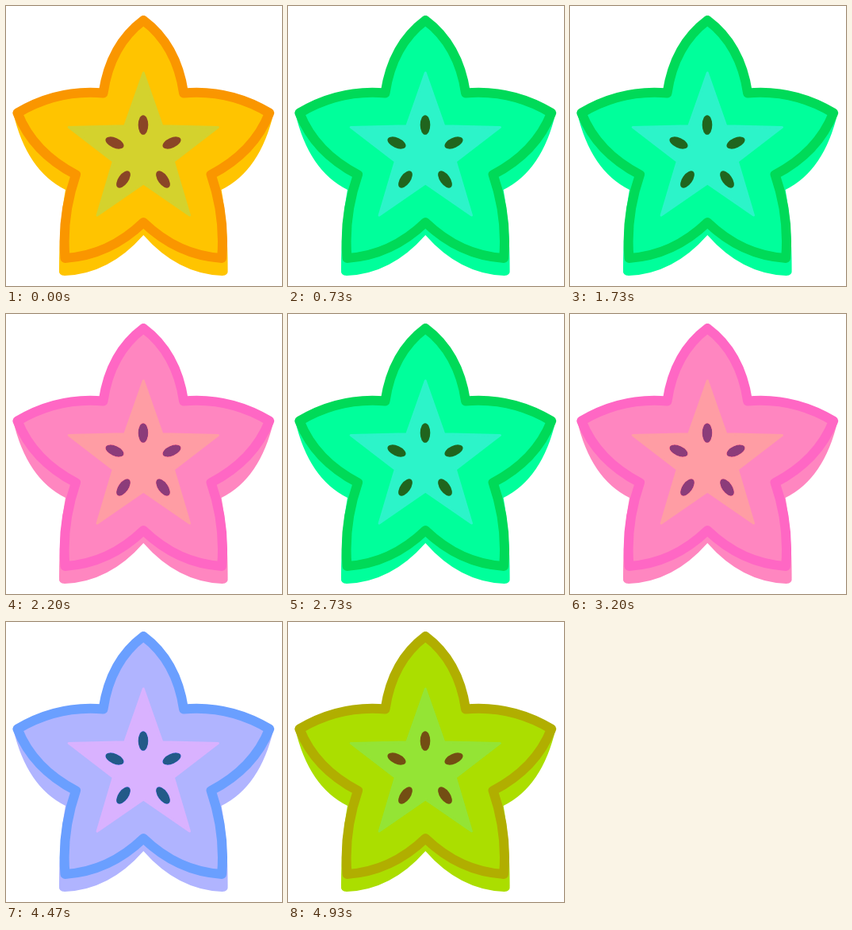
An HTML page that plays this animation: 348 by 352 pixels, repeating every 4990 ms.

```html
<!DOCTYPE html>
<html lang="en">
<head>
<meta charset="utf-8">
<title>Star fruit</title>
<style>
  html, body { margin: 0; width: 100%; height: 100%; overflow: hidden; background: #fff; }
  svg { display: block; width: 348px; height: 352px; }
  .side { fill: #ffc400; }
  .face { fill: #ffc400; stroke: #fa9600; stroke-width: 12; stroke-linejoin: round; }
  .core { fill: #d4d22d; stroke: #d4d22d; stroke-width: 3; stroke-linejoin: round; }
  .seed { fill: #8a4526; }
</style>
</head>
<body>
<svg id="fruit" viewBox="0 0 348 352"></svg>
<script>
const LOOP = 4990;
const STEP = 1000 / 15;
const STEPS_PER_TURN = 15;
const CX = 173.3, CY = 183;
const fruit = document.getElementById('fruit');

function add(tag, attrs) {
  const el = document.createElementNS('http://www.w3.org/2000/svg', tag);
  for (const name in attrs) el.setAttribute(name, attrs[name]);
  fruit.append(el);
}

// Closed symmetric shape from its left half: a start on the axis, then
// alternating control and end points of quadratic curves back to the axis.
function mirrored(half) {
  const right = half.map(([x, y]) => [2 * CX - x, y]).reverse();
  const [start, ...rest] = half.concat(right.slice(1));
  let d = 'M' + start;
  for (let i = 0; i < rest.length; i += 2) d += `Q${rest[i]} ${rest[i + 1]}`;
  return d + 'Z';
}

function straightStar(outer, inner) {
  const points = [];
  for (let i = 0; i < 10; i++) {
    const r = i % 2 ? inner : outer, a = i * Math.PI / 5;
    points.push([CX + r * Math.sin(a), CY - r * Math.cos(a)]);
  }
  return 'M' + points.join('L') + 'Z';
}

add('path', { class: 'side', d: mirrored([
  [CX, 134], [90, 134], [9, 134], [26, 207], [75, 231], [67, 275], [67, 331],
  [66, 339], [74, 339], [130, 337], [CX, 288]
]) });

add('path', { class: 'face', d: mirrored([
  [CX, 18], [131.5, 49], [122.5, 109.5], [65, 104.5], [14.5, 134.5], [34, 184], [88, 212],
  [70, 264], [74.5, 317], [130, 313.5], [CX, 272]
]) });

add('path', { class: 'core', d: straightStar(99, 40) });

const seeds = [
  [173, 149.5, 0], [137, 172, -66], [209, 172, 66], [148, 218, 36], [198, 218, -36]
];
for (const [x, y, turn] of seeds) {
  add('ellipse', { class: 'seed', rx: 6.3, ry: 12.3, transform: `translate(${x} ${y}) rotate(${turn})` });
}

function draw() {
  const t = performance.now() % LOOP;
  const step = Math.floor((t + 3.4) / STEP) % STEPS_PER_TURN;
  fruit.style.filter = `hue-rotate(${-step * 360 / STEPS_PER_TURN}deg)`;
  requestAnimationFrame(draw);
}
draw();
</script>
</body>
</html>
```
